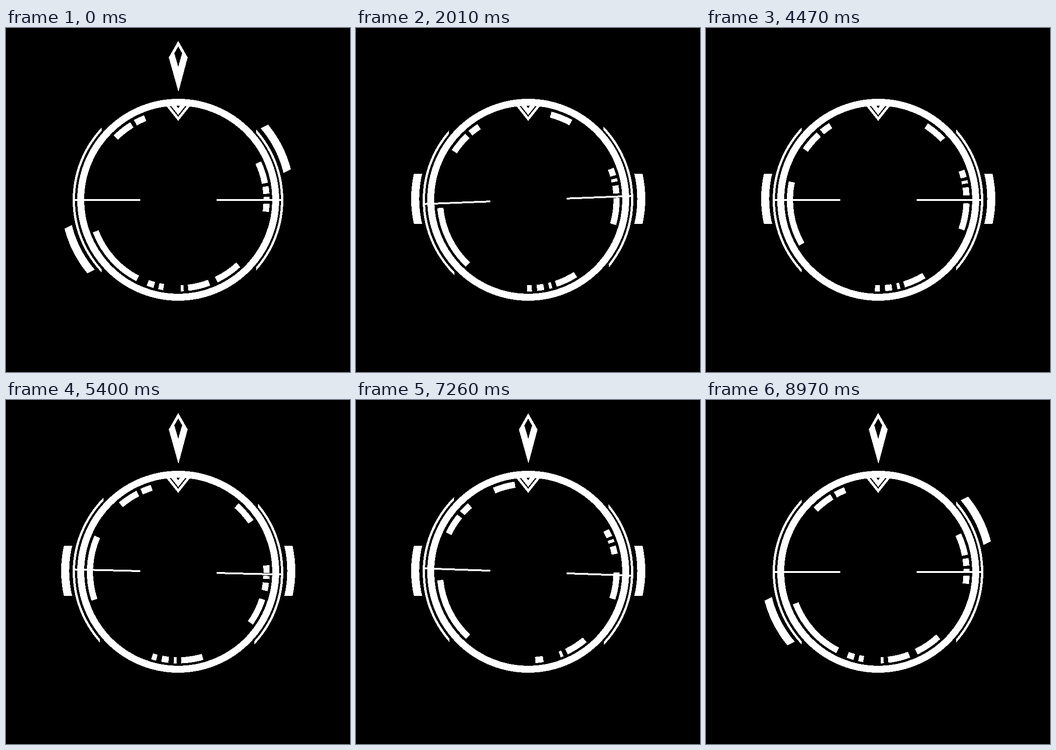
Write an HTML page that moves like this. It is 748x748 px and loops after 9 s.

```html
<!DOCTYPE html>
<html lang="en">
<head>
<meta charset="utf-8">
<title>Scope</title>
<style>
  html, body { margin: 0; width: 100%; height: 100%; overflow: hidden; background: #000; }
  svg { display: block; width: 100vw; height: 100vh; }
</style>
</head>
<body>
<svg viewBox="0 0 748 748" fill="#fff" shape-rendering="crispEdges">
  <g id="dial" fill="none" stroke="#fff" stroke-width="13.5"></g>
  <path id="chevron" fill-rule="evenodd"/>
  <circle cx="374.5" cy="373.5" r="212" fill="none" stroke="#fff" stroke-width="15"/>
  <g id="level"><path d="M150 372H292V376H150ZM458 372H599V376H458Z"/></g>
  <g id="brackets"></g>
  <path id="needle" fill-rule="evenodd"
    d="M374.5 28L395 64L375 139L354 64ZM374.5 40L366 55L374.5 84L383 55Z"/>
</svg>
<script>
const LOOP = 9000, STEP = 30, SPAN = LOOP - STEP;
const CX = 374.5, CY = 374, LEVEL_X = 374, BRACKET_Y = 371.5;
const DIAL_R = 192;
const $ = id => document.getElementById(id);

function addPath(parent, d) {
  const path = document.createElementNS('http://www.w3.org/2000/svg', 'path');
  path.setAttribute('d', d);
  parent.appendChild(path);
  return path;
}

const rotate = (el, angle, x = CX) => el.setAttribute('transform', `rotate(${angle} ${x} ${CY})`);

// Radial-ended block on the inner dial, angles in degrees clockwise from the right
function addBlock(start, end) {
  const point = deg => {
    const a = deg * Math.PI / 180;
    return `${CX + DIAL_R * Math.cos(a)} ${CY + DIAL_R * Math.sin(a)}`;
  };
  return addPath($('dial'), `M${point(start)}A${DIAL_R} ${DIAL_R} 0 0 1 ${point(end)}`);
}

// Slice of a ring whose ends are cut by straight lines; side is 1 or -1
function addSlice(parent, cx, cy, outer, inner, side, xOuter, yOuter, xInner, yInner) {
  const x1 = cx + side * xOuter, x2 = cx + side * xInner;
  const sweep = side > 0 ? 1 : 0;
  addPath(parent, `M${x1} ${cy - yOuter}A${outer} ${outer} 0 0 ${sweep} ${x1} ${cy + yOuter}` +
    `L${x2} ${cy + yInner}A${inner} ${inner} 0 0 ${1 - sweep} ${x2} ${cy - yInner}Z`);
}

const leg = (r, side) => Math.sqrt(r * r - side * side);

for (const [side, cut] of [[-1, 166], [1, 170]]) {
  addSlice($('level'), LEVEL_X, CY, 229, 224, side, cut, leg(229, cut), cut, leg(224, cut));
  addSlice($('brackets'), CX, BRACKET_Y, 254.5, 237, side, leg(254.5, 54.5), 54.5, leg(237, 54.5), 54.5);
}

$('chevron').setAttribute('d', [202, 193, 189, 174].map(tip => {
  const half = (tip - 167) * 0.8;
  return `M${CX - half} 167H${CX + half}L${CX} ${tip}Z`;
}).join(''));

[[69.5, 83.6], [86.5, 88.4], [99.5, 102.7], [225, 238.3], [241, 248],
 [-8.8, -4], [-2, 0], [2.4, 7.6]].forEach(block => addBlock(...block));

// Smooth closed curve through keys, flat at its peaks
function track(times, values) {
  const last = times.length - 1;
  const slope = i => (values[i + 1] - values[i]) / (times[i + 1] - times[i]);
  const tangents = values.map((_, i) => {
    const before = slope(i === 0 ? last - 1 : i - 1);
    const after = slope(i === last ? 0 : i);
    return before * after > 0 ? 2 * before * after / (before + after) : 0;
  });
  return t => {
    let i = 0;
    while (i < last - 1 && t >= times[i + 1]) i++;
    const h = times[i + 1] - times[i], u = (t - times[i]) / h, v = 1 - u;
    return values[i] * v * v * (1 + 2 * u) + values[i + 1] * u * u * (3 - 2 * u) +
      h * u * v * (tangents[i] * v - tangents[i + 1] * u);
  };
}

const KEYS = [0, 930, 3120, 4470, 6300, 7980, SPAN];
const dialAngle = track(KEYS, [0, 12.2, -36.9, -10.6, 12.2, -39.7, 0]);
const bracketAngle = track([0, 930, 1500, 7500, 7980, SPAN], [-27.1, 9, 0, 0, 28.9, -27.1]);

// Blocks that also slide along the dial
const sliders = [
  [41.8, [117.4, 117.6, 173.1, 160.6, 154.6, 149.4, 117.4]],
  [17.3, [47.2, 9.8, 11.7, 12.8, 14.3, 26.9, 47.2]],
  [14.1, [-25, -64.8, -60, -46.5, -66.4, -106.6, -25]],
  [4.5, [105.7, 91.7, 91.7, 91.7, 91.7, 105.7, 105.7]],
].map(([size, values]) => ({ el: addBlock(0, size), angle: track(KEYS, values) }));

function render(time) {
  const t = Math.floor(time % LOOP / STEP) * STEP;
  const turn = 2 * Math.PI * t / SPAN;

  rotate($('dial'), dialAngle(t));
  sliders.forEach(s => rotate(s.el, s.angle(t)));
  rotate($('brackets'), bracketAngle(t));

  const sway = Math.sin(turn);
  rotate($('level'), -2.2 * sway - 0.1 * Math.sin(2 * turn) * Math.sign(sway), LEVEL_X);

  const pulse = Math.cos(15 * turn);
  const scale = 0.956 + 0.044 * pulse;
  $('needle').setAttribute('visibility', pulse > 0 ? 'visible' : 'hidden');
  $('needle').setAttribute('transform',
    `translate(${CX} 83.5) scale(${scale}) translate(${-CX} -83.5)`);
}

let origin;
function tick(now) {
  origin ??= now;
  render(now - origin);
  requestAnimationFrame(tick);
}
render(0);
requestAnimationFrame(tick);
</script>
</body>
</html>
```
